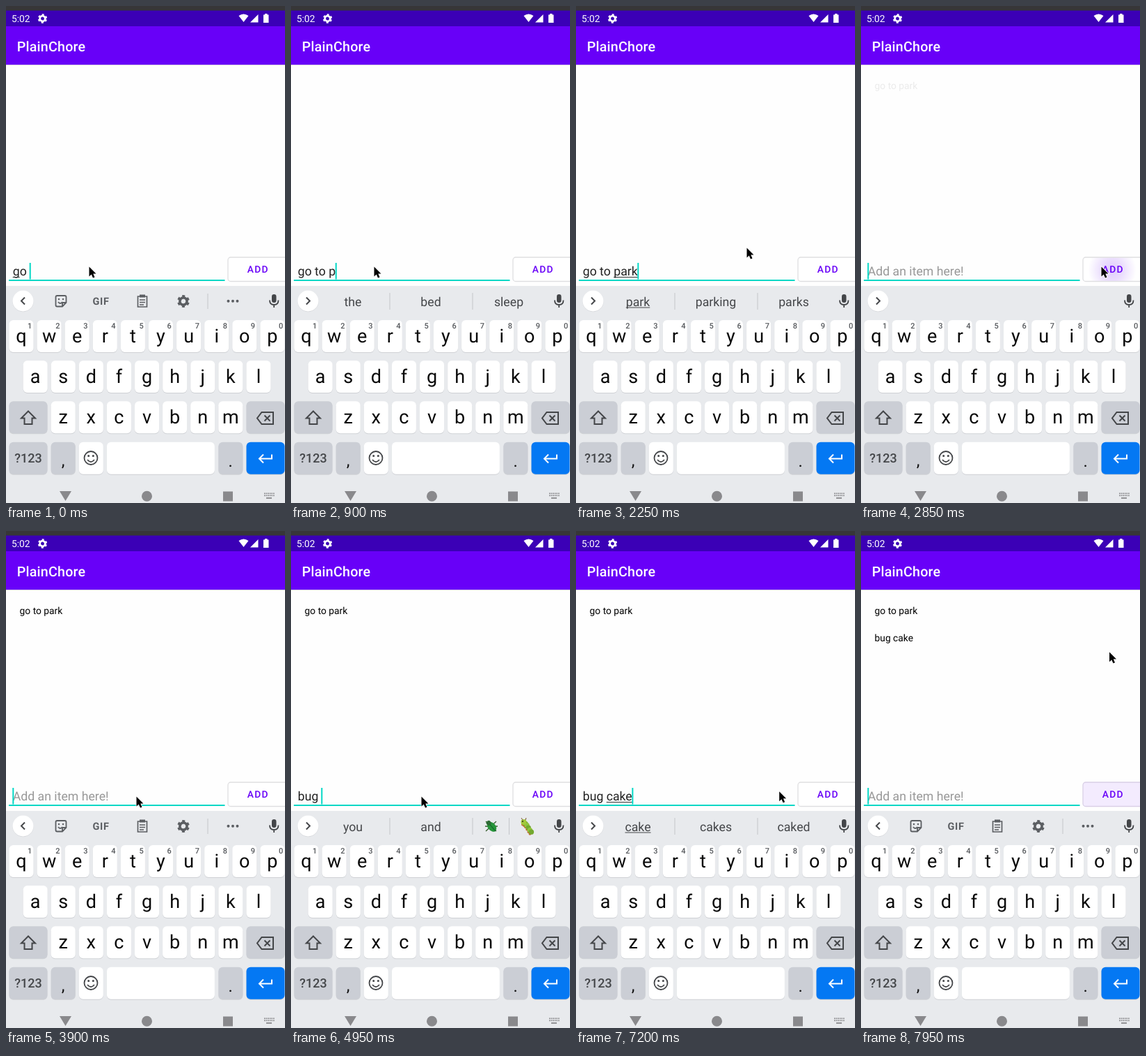
Recreate the animation shown at these times as an HTML page with a canvas. Size 401 by 712 pixels, loop 8000 ms.

```html
<!DOCTYPE html>
<html lang="en">
<head>
<meta charset="utf-8">
<title>To-do list</title>
<style>
  html, body { margin: 0; width: 100%; height: 100%; overflow: hidden; background: #fefefe; }
  canvas { display: block; }
</style>
</head>
<body>
<canvas id="stage" width="401" height="712"></canvas>
<script>
const ctx = document.getElementById('stage').getContext('2d');
const LOOP = 8000, TICK = 150;
const PRESSES = [2700, 7500];
const INK = '#444649', VIOLET = '#6800f8', PITCH = 40.1;

// time, typed text, underlined part, suggestions (null shows the toolbar)
const TYPING = [
  [0, 'go ', 'g', null],
  [150, 'go ', '', ''],
  [300, 'go ', '', 'to,and,for'],
  [450, 'go t', '', 'to,and,for'],
  [600, 'go to', 't', 't,to,the'],
  [750, 'go to ', '', 'to,too,the'],
  [900, 'go to p', '', 'the,bed,sleep'],
  [1050, 'go to p', 'p', 'p,pick,play'],
  [1200, 'go to pa', 'p', 'p,pick,play'],
  [1350, 'go to pa', 'pa', 'pa,party,pay'],
  [1500, 'go to par', 'pa', 'pa,party,pay'],
  [1650, 'go to park', 'par', 'par,park,party'],
  [1950, 'go to park', 'park', 'park,parking,parks'],
  [2700, '', '', ''],
  [3000, '', '', null],
  [4200, 'b', '', null],
  [4350, 'b', 'b', 'b,but,by'],
  [4500, 'bu', 'b', 'b,but,by'],
  [4650, 'bug', 'bu', 'bu,but,buy'],
  [4800, 'bug ', '', 'bug,bugs,big'],
  [4950, 'bug ', '', 'you,and,*'],
  [6000, 'bug c', '', 'you,and,*'],
  [6150, 'bug c', 'c', 'c,can,call'],
  [6300, 'bug ca', 'c', 'c,can,call'],
  [6450, 'bug ca', 'ca', 'ca,can,call'],
  [6600, 'bug cak', 'ca', 'ca,can,call'],
  [6750, 'bug cake', 'cak', 'cak,cake,cakes'],
  [6900, 'bug cake', 'cake', 'cake,cakes,caked'],
  [7500, '', '', ''],
  [7800, '', '', null],
];

const POINTER = [
  [0, 119, 373], [1950, 119, 373], [2250, 245, 346], [2550, 345, 373],
  [2850, 345, 373], [3450, 187, 380], [6900, 187, 380], [7350, 344, 369],
  [7800, 344, 369], [7950, 356.5, 173],
];

function setFont(size, weight = 400) {
  ctx.font = `${weight} ${size}px Roboto, sans-serif`;
  ctx.textRendering = 'geometricPrecision';
}

function text(str, x, y, size, color, { weight = 400, align = 'left', spacing = 0 } = {}) {
  setFont(size, weight);
  ctx.letterSpacing = spacing + 'px';
  ctx.textAlign = align;
  ctx.fillStyle = color;
  ctx.fillText(str, x, y);
  ctx.letterSpacing = '0px';
}

function width(str, size) {
  setFont(size);
  return ctx.measureText(str).width;
}

function rect(x, y, w, h, color) {
  ctx.fillStyle = color;
  ctx.fillRect(x, y, w, h);
}

function box(x, y, w, h, r, color) {
  ctx.beginPath();
  ctx.roundRect(x, y, w, h, r);
  ctx.fillStyle = color;
  ctx.fill();
}

function disc(x, y, r, color) {
  ctx.beginPath();
  ctx.arc(x, y, r, 0, 7);
  ctx.fillStyle = color;
  ctx.fill();
}

function fill(d, color) {
  ctx.fillStyle = color;
  ctx.fill(new Path2D(d));
}

function line(d, color, w = 2) {
  ctx.strokeStyle = color;
  ctx.lineWidth = w;
  ctx.stroke(new Path2D(d));
}

function gear(x, y, r, color) {
  const ring = (radius, w) => {
    ctx.beginPath();
    ctx.arc(x, y, radius, 0.26, 0.26 + 2 * Math.PI);
    ctx.lineWidth = w;
    ctx.stroke();
  };
  ctx.strokeStyle = color;
  ring(r * 0.58, r * 0.42);
  ctx.setLineDash([r * 0.85 * Math.PI / 6]);
  ring(r * 0.85, r * 0.32);
  ctx.setLineDash([]);
}

function drawBars() {
  rect(0, 0, 401, 712, '#fefefe');
  rect(0, 0, 401, 7, '#373638');
  rect(0, 6.5, 401, 23, '#3b00b6');
  rect(0, 29, 401, 55, VIOLET);
  rect(0, 84, 401, 1, '#d6cfe0');
  text('5:02', 8, 23, 13.8, '#fff');
  gear(52.5, 18, 6.6, '#fff');
  fill('M334.5 14Q341.500 9 348.500 14L341.500 23Z', '#fff');
  fill('M351 23.500L362.500 12V23.500Z', '#fff');
  fill('M370 12.500H372V11H375.500V12.500H377.500V24H370Z', '#fff');
  text('PlainChore', 15.7, 65, 19.7, '#fff', { weight: 500, spacing: 0.2 });
}

function key(label, x, y, w = 35, color = '#fff') {
  box(x, y + 1, w, 46, 6, '#cfd1d5');
  box(x, y, w, 46, 6, color);
  if (label) text(label, x + w / 2, y + 32, 27, '#080808', { align: 'center' });
}

function drawKeyboard() {
  const gray = '#cbced5', y3 = 566.3, y4 = 624.7;
  rect(0, 401, 401, 311, '#e8eaed');
  [['qwertyuiop', 4.5, 450], ['asdfghjkl', 24.7, 508], ['zxcvbnm', 64.7, y3]].forEach(([row, x0, y]) =>
    [...row].forEach((c, i) => key(c, x0 + PITCH * i, y)));
  for (let i = 0; i < 10; i++)
    text((i + 1) % 10, 34.2 + PITCH * i, 462, 11, '#55585c', { weight: 500, align: 'center' });

  key('', 4.5, y3, 55, gray);
  line('M32 580.500L42 590.500H37.500V599H26.500V590.500H22Z', INK);
  key('', 345.5, y3, 55, gray);
  line('M367.500 582H384V599H367.500L361 590.500ZM371.500 586.500L379.500 594.500M379.500 586.500L371.500 594.500', INK);

  key('', 4.5, y4, 55, gray);
  text('?123', 32, 654, 18, INK, { weight: 500, align: 'center' });
  key('', 64.7, y4, 35, gray);
  text(',', 82, 659, 24, '#111', { align: 'center' });
  key('', 104.8, y4);
  line('M131.500 647.500A9.500 9.500 0 1 1 112.500 647.500A9.500 9.500 0 1 1 131.500 647.500M117 650Q122 656 127 650', INK, 1.8);
  disc(118.7, 644.5, 1.5, INK);
  disc(125.3, 644.5, 1.5, INK);
  key('', 144.9, y4, 155);
  key('', 305.4, y4, 35, gray);
  text('.', 322.7, 660, 24, '#111', { align: 'center' });
  key('', 345.5, y4, 55, '#0478f3');
  line('M382 642.500V648.500H364.500M370 642.500L364 648.500L370 654.500', '#fff');

  const nav = '#89898c';
  fill('M77 695H94L85.500 709Z', nav);
  disc(202.5, 702.3, 7.5, nav);
  rect(312, 695.5, 14, 14, nav);
  for (let i = 0; i < 12; i++)
    rect(371 + (i % 6) * 2.6, 697.5 + (i / 6 | 0) * 3, 1.7, 1.7, nav);
  rect(374, 704, 8, 1.8, nav);
}

function drawToolbar() {
  const gray = '#5b5e62';
  line('M27 417.500L22 422.500L27 427.500', INK);
  line('M73.500 415H84.500Q86.500 415 86.500 417V425L81 430.500H73.500Q71.500 430.500 71.500 428.500V417Q71.500 415 73.500 415M86 425H81V430M75 424Q78 428 81 424', gray, 1.8);
  disc(76, 420, 1.2, gray);
  disc(82, 420, 1.2, gray);
  text('GIF', 136.5, 427.5, 14.5, gray, { weight: 700, align: 'center', spacing: 0.7 });
  line('M189.500 416H202.500V431H189.500ZM192 421H200M192 424.500H200M192 428H198', gray, 1.7);
  rect(192, 413.5, 8, 4, gray);
  gear(255, 423, 8.8, gray);
  rect(289.5, 412, 1, 22, '#c3c5c9');
  for (const x of [319.5, 326, 332.5]) disc(x, 422.7, 2, gray);
}

function drawInsects() {
  line('M280 416L295 430M295 416L280 430M279 423H297', '#355c2c', 1.3);
  ctx.save();
  ctx.translate(288, 423);
  ctx.rotate(-0.7);
  ctx.beginPath();
  ctx.ellipse(0, 1, 5.5, 8, 0, 0, 7);
  ctx.fillStyle = '#25953a';
  ctx.fill();
  disc(0, -6, 3.4, '#2c6b34');
  line('M0 -3V9', '#12612a', 1);
  ctx.restore();
  for (let i = 0; i < 6; i++) {
    const x = 335 + i * 2.1, y = 418 + i * 2.4 - Math.sin(i) * 1.2;
    disc(x - 2, y + 2.5, 2, '#c06a2d');
    disc(x, y, 3.6, i % 2 ? '#73a92f' : '#8fc43c');
  }
  disc(334.5, 417, 4, '#a2c83c');
  disc(333, 416, 1, '#30351c');
  line('M333 414L331 411M337 414L338 411', '#7a5a2a', 1);
}

function drawSuggestions(words, composing) {
  line('M22 417.500L27 422.500L22 427.500', INK);
  if (!words) return;
  const divider = x => rect(x - 0.5, 411, 1, 24, '#c3c5c9');
  divider(142);
  divider(261);
  words.split(',').forEach((word, i) => {
    if (word === '*') {
      divider(313.5);
      return drawInsects();
    }
    const x = 89 + 112 * i;
    text(word, x, 429.5, 17.7, INK, { align: 'center' });
    if (i === 0 && composing) {
      const w = width(word, 17.7);
      rect(x - w / 2, 431.5, w, 1, INK);
    }
  });
}

function drawStrip(words, composing) {
  disc(24.5, 423, 15.2, '#d8dadd');
  disc(24.5, 422.5, 15, '#fff');
  if (words === null) drawToolbar();
  else drawSuggestions(words, composing);
  box(382, 413, 6.5, 12, 3.2, INK);
  line('M379 421.500Q379 428 385.200 428Q391.500 428 391.500 421.500M385.200 428V432', INK, 1.8);
}

function drawInput(typed, composing, caretOn) {
  const x = 9.7, size = 17.7;
  text(typed || 'Add an item here!', x, 386.3, size, typed ? '#222' : '#989898');
  if (composing) {
    const start = width(typed.slice(0, typed.lastIndexOf(composing)), size);
    rect(x + start, 388, width(composing, size), 1, '#333');
  }
  rect(4, 392, 310.5, 2, '#03d8c6');
  if (caretOn) rect(x + width(typed, size) - 0.4, 368, 2, 23.5, '#03d8c6');
}

function drawButton(sincePress) {
  ctx.beginPath();
  ctx.roundRect(319, 360, 90, 34.5, 4);
  ctx.fillStyle = '#fff';
  ctx.fill();
  if (sincePress >= 0 && sincePress < 750) {
    if (sincePress < 300) {
      const glow = ctx.createRadialGradient(361, 378, 0, 361, 378, 18 + sincePress / 9);
      glow.addColorStop(0, 'rgba(98,0,238,.2)');
      glow.addColorStop(0.45, 'rgba(98,0,238,.13)');
      glow.addColorStop(1, 'rgba(98,0,238,0)');
      ctx.fillStyle = glow;
    } else {
      ctx.fillStyle = `rgba(98,0,238,${sincePress < 600 ? 0.08 : 0.04})`;
    }
    ctx.fill();
  }
  ctx.strokeStyle = sincePress >= 300 && sincePress < 600 ? '#d9cfe6' : '#dfdfe1';
  ctx.lineWidth = 1.3;
  ctx.stroke();
  text('ADD', 346.8, 382.4, 13.8, VIOLET, { weight: 500, spacing: 1.2 });
}

function drawItem(label, y, sincePress) {
  if (sincePress < 150) return;
  text(label, 19.6, y, 13.8, `rgba(0,0,0,${sincePress < 300 ? 0.08 : 1})`);
}

function drawPointer(t) {
  const next = POINTER.findIndex(p => p[0] > t);
  const [t1, x1, y1] = POINTER.at(next);
  const [t0, x0, y0] = POINTER.at(next < 0 ? -1 : next - 1);
  const k = t1 > t0 ? (t - t0) / (t1 - t0) : 0;
  const arrow = 'M.5 .5V14.500L3.700 11.500L6 16.500L8.500 15.500L6.300 10.500H10.500Z';
  ctx.save();
  ctx.translate(x0 + (x1 - x0) * k, y0 + (y1 - y0) * k);
  line(arrow, '#fff', 1.8);
  fill(arrow, '#000');
  ctx.restore();
}

function draw(now) {
  const t = Math.floor((now % LOOP) / TICK) * TICK;
  const [, typed, composing, words] = TYPING.findLast(s => s[0] <= t);
  const since = PRESSES.map(p => t - p);
  const caretOn = !(t >= 3450 && t < 3900) && !(t >= 5400 && t < 5850);
  drawBars();
  drawItem('go to park', 119, since[0]);
  drawItem('bug cake', 158, since[1]);
  drawInput(typed, composing, caretOn);
  drawButton(since[1] >= 0 ? since[1] : since[0]);
  drawKeyboard();
  drawStrip(words, composing);
  drawPointer(t);
}

let begin;
function frame(now) {
  begin ??= now;
  draw(now - begin);
  requestAnimationFrame(frame);
}
requestAnimationFrame(frame);
</script>
</body>
</html>
```
